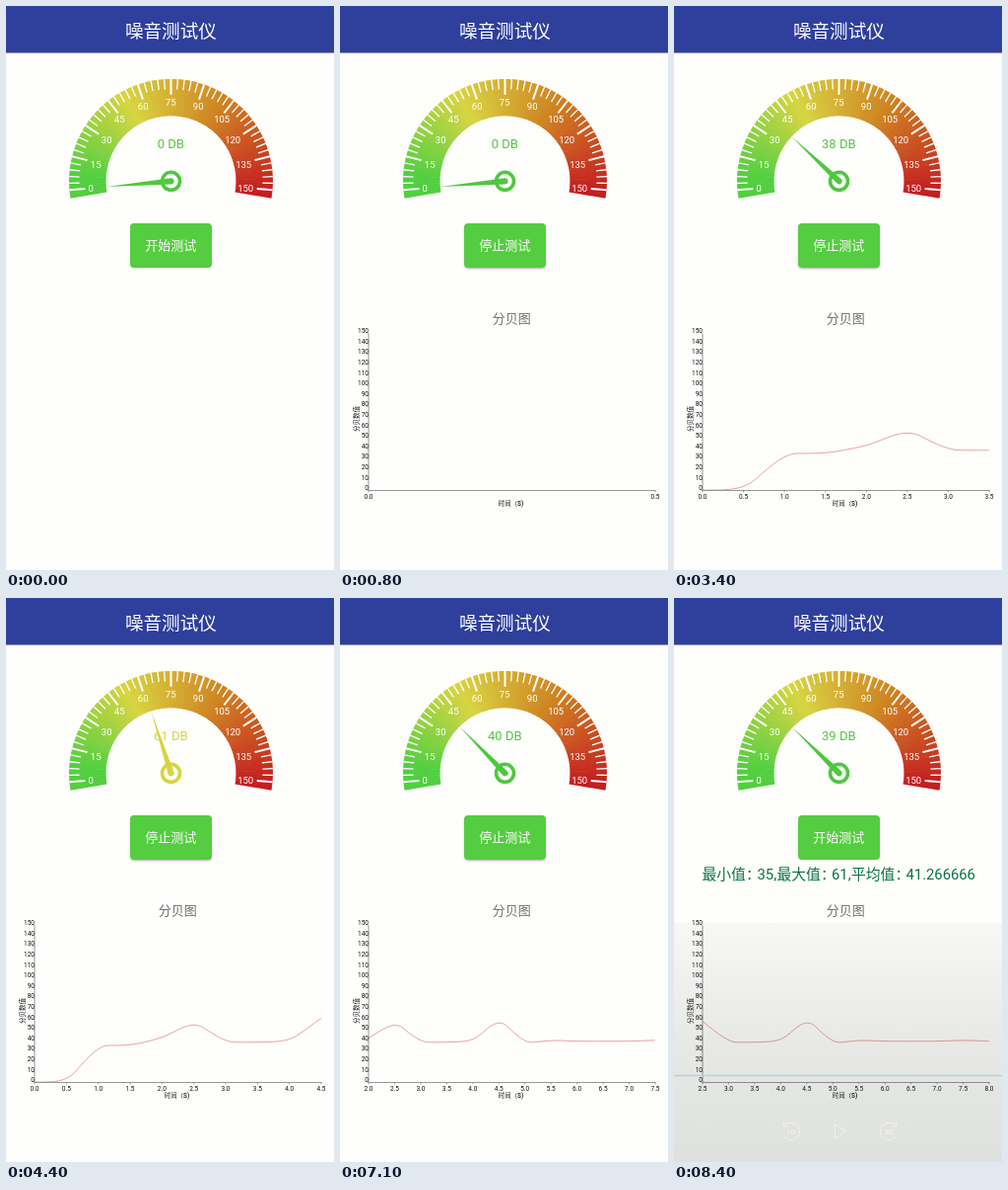
Write an HTML page that moves like this. It is 333 px wide and 571 px high and loops after 8.5 s.

```html
<!DOCTYPE html>
<html lang="zh-CN">
<head>
<meta charset="utf-8">
<title>噪音测试仪</title>
<style>
html, body { margin: 0; width: 100%; height: 100%; overflow: hidden; background: #fefefc; }
svg { display: block; width: 333px; height: 571px; font-family: Roboto, "Noto Sans CJK SC", "Noto Sans CJK", sans-serif; }
</style>
</head>
<body>
<svg id="stage" viewBox="0 0 333 571">
  <defs>
    <linearGradient id="shade" x1="0" y1="0" x2="0" y2="1">
      <stop offset="0" stop-color="#1c2c24" stop-opacity=".03"/>
      <stop offset=".5" stop-color="#1c2c24" stop-opacity=".1"/>
      <stop offset="1" stop-color="#1c2c24" stop-opacity=".14"/>
    </linearGradient>
    <filter id="soft" x="-20%" y="-20%" width="140%" height="150%"><feGaussianBlur stdDeviation="1.3"/></filter>
  </defs>
  <rect width="333" height="571" fill="#fefefc"/>
  <rect width="333" height="47.5" fill="#2e3f9c"/>
  <text x="167.4" y="32" font-size="18.6" fill="#fff" text-anchor="middle">噪音测试仪</text>

  <g id="ring"></g>
  <g id="ticks" stroke="#fff"></g>
  <g id="marks" font-size="9.5" fill="#fff" text-anchor="middle"></g>
  <text id="reading" x="167.3" y="143.5" font-size="13" text-anchor="middle"></text>
  <g id="needle" transform="translate(167.5 177.3)">
    <circle r="9" fill="none" stroke="currentColor" stroke-width="3.6"/>
    <path id="hand" d="M-65.5 0L0 -3.1A3.1 3.1 0 0 1 0 3.1Z" fill="currentColor"/>
  </g>

  <rect id="shadow" x="126.5" y="222" width="82" height="44" rx="4" fill="#000" filter="url(#soft)"/>
  <rect x="126" y="220" width="83" height="45" rx="4" fill="#55cd40"/>
  <text id="action" x="167.2" y="247.2" font-size="13" fill="#fff" text-anchor="middle"></text>

  <g id="summary" font-size="14.8" fill="#0b7049"></g>

  <g id="chart">
    <text x="174.3" y="321.3" font-size="13" fill="#707070" text-anchor="middle">分贝图</text>
    <path id="curve" fill="none" stroke="#e08c88" stroke-width=".8"/>
    <path d="M29 331.5V490.5H320.5" fill="none" stroke="#8c8c8c" stroke-width=".9"/>
    <g fill="#111" font-size="6.5" stroke-width=".7">
      <g id="yAxis" text-anchor="end"></g>
      <g id="xAxis" text-anchor="middle"></g>
      <text x="173.5" y="505.7" font-size="6.4" font-weight="500" text-anchor="middle">时间（S)</text>
      <text transform="translate(19.2 418) rotate(-90)" font-weight="500" text-anchor="middle">分贝数值</text>
    </g>
  </g>

  <g id="player">
    <rect y="329" width="333" height="242" fill="url(#shade)"/>
    <path d="M0 483.5H333" stroke="#a9d0e2" stroke-width="1.3" opacity=".8"/>
    <g fill="none" stroke="#fff" stroke-width="1" opacity=".5">
      <path d="M163.5 533L174.5 540L163.5 547Z"/>
      <path d="M111 535A9 9 0 1 1 111 545M111 530V535H116"/>
      <path d="M226 535A9 9 0 1 0 226 545M226 530V535H221"/>
    </g>
    <g font-size="8" fill="#fff" opacity=".6" text-anchor="middle">
      <text x="118.5" y="543">10</text><text x="218" y="543">30</text>
    </g>
  </g>
</svg>
<script>
const LOOP = 8500, STOP = 7900, START = 100;
const CX = 167.5, CY = 177.3;
const LEFT = 29, RIGHT = 320, BASE = 490.1, UNIT = 1.06, SPAN = 11;
const GREEN = '#4ec83e', YELLOW = '#d8d43e';
// One sample per half second of measuring, and the moment each arrives.
const levels = [0, 0, 35, 35, 42, 58, 38, 38, 39, 61, 37, 40, 39, 39, 39, 40, 39];
const arrivals = [START, 700, 1100, 1600, 2100, 2500, 3000, 3400, 3900, 4400,
  4800, 5300, 5700, 6200, 6600, 7100, 7500];
// Ring colours by decibel value.
const stops = [
  [6, [82, 207, 64]], [52, [215, 213, 66]], [100, [208, 132, 34]], [154, [196, 24, 32]]
];

const $ = id => document.getElementById(id);
const clamp = v => Math.min(1, Math.max(0, v));
const mix = (a, b, k) => a + (b - a) * k;

function add(parent, tag, attrs, text) {
  const el = document.createElementNS('http://www.w3.org/2000/svg', tag);
  for (const key in attrs) el.setAttribute(key, attrs[key]);
  if (text !== undefined) el.textContent = text;
  parent.appendChild(el);
  return el;
}

const angleOf = db => -5 + db * 190 / 150;

function polar(deg, r) {
  const a = deg * Math.PI / 180;
  return [CX - r * Math.cos(a), CY - r * Math.sin(a)];
}

function ringColour(db) {
  let i = 0;
  while (i < stops.length - 2 && db > stops[i + 1][0]) i++;
  const [[from, a], [to, b]] = [stops[i], stops[i + 1]];
  const k = clamp((db - from) / (to - from));
  return `rgb(${a.map((c, j) => Math.round(mix(c, b[j], k)))})`;
}

function buildGauge() {
  const from = -9.7, to = 189.7, count = 160, step = (to - from) / count, r = 84.7;
  for (let i = 0; i < count; i++) {
    const a = from + i * step;
    const b = Math.min(to, a + step + 0.4);
    add($('ring'), 'path', {
      d: `M${polar(a, r)}A${r} ${r} 0 0 1 ${polar(b, r)}`,
      fill: 'none', stroke: ringColour((a + 5) * 150 / 190), 'stroke-width': 37.4
    });
  }
  for (let db = 0; db <= 150; db += 3) {
    const major = db % 15 === 0;
    const a = angleOf(db);
    add($('ticks'), 'path', {
      d: `M${polar(a, 103.5)}L${polar(a, major ? 87.5 : 93)}`,
      'stroke-width': major ? 2 : 1.3
    });
  }
  // Offsets of the left labels; the right side mirrors them, wide labels pulled inwards.
  const spots = [[81, 8], [76, -16], [65, -41], [52, -62], [28, -75], [0, -79]];
  for (let i = 0; i <= 10; i++) {
    const [dx, dy] = spots[Math.min(i, 10 - i)];
    const side = i < 5 ? -1 : 1;
    const pull = i === 10 ? 5 : i > 7 ? 2 : 0;
    add($('marks'), 'text', { x: 167.2 + side * dx - pull, y: 180.4 + dy }, i * 15);
  }
}

function buildText() {
  for (let v = 0; v <= 150; v += 10) {
    const y = BASE - v * UNIT;
    add($('yAxis'), 'path', { d: `M27.5 ${y}H29`, stroke: '#777' });
    add($('yAxis'), 'text', { x: 29, y }, v);
  }
  const parts = [['最小值：', 28.5], ['35,', 84.5], ['最大值：', 104.5],
    ['61,', 160], ['平均值：', 180], ['41.266666', 235.5]];
  for (const [text, x] of parts) add($('summary'), 'text', { x, y: 285.2 }, text);
}

// Smoothed line: each sample is a control point, knots lie a third of the way on.
function curvePath(points) {
  const along = (a, b, k) => [mix(a[0], b[0], k), mix(a[1], b[1], k)];
  let d = `M${points[0]}`;
  points.forEach((p, i) => {
    const next = points[i + 1] || p;
    const after = points[i + 2] || next;
    d += `C${along(p, next, .67)} ${next} ${along(next, after, .33)}`;
  });
  return d;
}

let drawn = -1;
function drawChart(last) {
  if (last === drawn) return;
  drawn = last;
  const first = Math.max(0, last - SPAN);
  const gap = (RIGHT - LEFT) / Math.max(1, last - first);
  const points = [];
  $('xAxis').replaceChildren();
  for (let i = first; i <= last; i++) {
    const x = LEFT + (i - first) * gap;
    points.push([x, BASE - levels[i] * UNIT]);
    add($('xAxis'), 'path', { d: `M${x} 490.5V492.3`, stroke: '#777' });
    add($('xAxis'), 'text', { x, y: 499.2 }, (i / 2).toFixed(1));
  }
  $('curve').setAttribute('d', last > 1 ? curvePath(points) : '');
}

function render(t) {
  const running = t >= START && t < STOP;
  const last = Math.max(0, arrivals.filter(a => a <= t).length - 1);
  const db = levels[last];
  const colour = db > 40 ? YELLOW : GREEN;
  const tick = Math.floor(t / 100) * 100;

  $('reading').textContent = db + ' DB';
  $('reading').setAttribute('fill', colour);
  $('needle').style.color = colour;
  $('hand').setAttribute('transform', `rotate(${angleOf(db)})`);
  $('action').textContent = running ? '停止测试' : '开始测试';
  $('shadow').setAttribute('opacity', .08 + .22 * clamp(tick / 400) * (1 - clamp((tick - STOP) / 300)));
  $('chart').style.display = t >= START ? '' : 'none';
  $('summary').style.display = t >= STOP ? '' : 'none';
  $('player').setAttribute('opacity', clamp((tick - 8000) / 400));
  drawChart(last);
}

buildGauge();
buildText();
const origin = performance.now();
function frame() {
  render((performance.now() - origin) % LOOP);
  requestAnimationFrame(frame);
}
frame();
</script>
</body>
</html>
```
